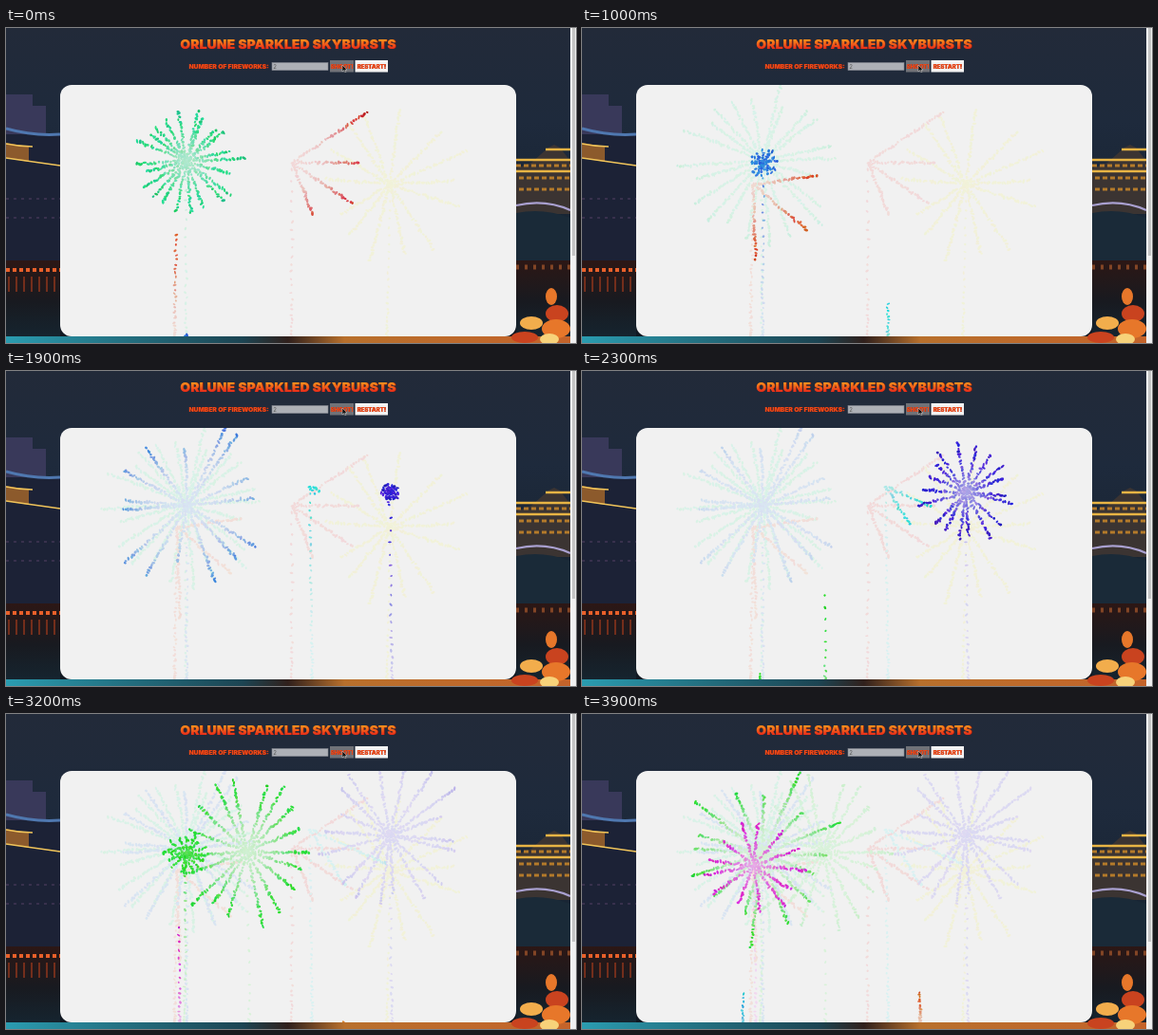
Animation, 600 px wide and 332 px high, one loop 4 s. Source, as an HTML page with a canvas:

```html
<!DOCTYPE html>
<html lang="en">
<head>
<meta charset="utf-8">
<title>Fireworks</title>
<style>
html, body { margin: 0; width: 100%; height: 100%; overflow: hidden; background: #1c2536; }
#stage { position: absolute; left: 0; top: 0; width: 600px; height: 332px; overflow: hidden; }
#stage > svg { position: absolute; left: 0; top: 0; }
canvas { position: absolute; left: 57px; top: 60px; border-radius: 12px; background: #f1f1f1; }
text { font-family: Inter, "DejaVu Sans", sans-serif; font-weight: 900; text-anchor: middle; }
.title { font-size: 13.8px; letter-spacing: .2px; fill: url(#flame); text-shadow: .6px .8px 0 #a81c08; }
.small { font-size: 6.7px; fill: #ec4a18; text-shadow: .4px .4px 0 #a81c08; }
.button { font-size: 6px; }
.value { font-size: 6px; font-weight: 400; fill: #555; }
</style>
</head>
<body>
<div id="stage">
<svg width="600" height="332" viewBox="0 0 600 332">
  <defs>
    <linearGradient id="sky" x2="0" y2="1">
      <stop offset="0" stop-color="#222a39"/>
      <stop offset=".3" stop-color="#1e2a3c"/>
      <stop offset=".7" stop-color="#172331"/>
      <stop offset="1" stop-color="#10161f"/>
    </linearGradient>
    <linearGradient id="water" x2="0" y2="1">
      <stop offset="0" stop-color="#2c1715"/>
      <stop offset=".5" stop-color="#181a20"/>
      <stop offset="1" stop-color="#152632"/>
    </linearGradient>
    <linearGradient id="shore">
      <stop offset="0" stop-color="#2a9cb0"/>
      <stop offset=".42" stop-color="#1c4452"/>
      <stop offset=".5" stop-color="#30201c"/>
      <stop offset=".6" stop-color="#b8702c"/>
      <stop offset="1" stop-color="#c4632a"/>
    </linearGradient>
    <linearGradient id="flame" x2="0" y2="1">
      <stop offset=".25" stop-color="#f8901c"/>
      <stop offset=".8" stop-color="#e8301a"/>
    </linearGradient>
  </defs>
  <rect width="600" height="332" fill="url(#sky)"/>
  <!-- left bank -->
  <path d="M0 70h28v12h14v30H0z" fill="#39395a"/>
  <path d="M0 112h57v133H0z" fill="#1c2236"/>
  <path d="M0 106q28 8 57 6" fill="none" stroke="#4f78b0" stroke-width="3"/>
  <path d="M0 121l24 4v16l-24 -4z" fill="#8c5a2c"/>
  <path d="M0 137q28 4 57 8M0 122q14 3 28 3" fill="none" stroke="#f0c45a" stroke-width="1.6"/>
  <path d="M0 180h57M0 200h57" stroke="#554064" stroke-dasharray="3 5"/>
  <rect y="245" width="57" height="87" fill="url(#water)"/>
  <path d="M0 255h57" stroke="#e8602a" stroke-width="4" stroke-dasharray="4 3"/>
  <path d="M2 270h54" stroke="#b8401c" stroke-width="16" stroke-dasharray="2 6" opacity=".55"/>
  <!-- right bank -->
  <path d="M537 148l16 -6 18 -16 6 -3 6 3 11 14v56h-57z" fill="#3b3432"/>
  <path d="M537 139h57M537 151h57M568 128h26" stroke="#e8b444" stroke-width="2.4"/>
  <path d="M537 145h57M540 158h54M540 170h54" stroke="#b47a2a" stroke-width="3" stroke-dasharray="5 3"/>
  <path d="M537 187q30 -7 57 5" fill="none" stroke="#a9a0d0" stroke-width="2.2"/>
  <path d="M537 195q28 -6 57 5v45h-57z" fill="#1a2a38"/>
  <rect x="537" y="245" width="57" height="87" fill="url(#water)"/>
  <path d="M537 252h57" stroke="#a8582c" stroke-width="5" stroke-dasharray="3 6" opacity=".7"/>
  <!-- foreground -->
  <path d="M0 325h594v7H0z" fill="url(#shore)"/>
  <g fill="#e7772a">
    <ellipse cx="574" cy="283" rx="6" ry="9"/>
    <ellipse cx="580" cy="301" rx="12" ry="9" fill="#c9431f"/>
    <ellipse cx="553" cy="311" rx="12" ry="7" fill="#f2ad4c"/>
    <ellipse cx="579" cy="317" rx="15" ry="10"/>
    <ellipse cx="546" cy="326" rx="14" ry="6" fill="#c9431f"/>
    <ellipse cx="572" cy="328" rx="10" ry="6" fill="#f7d27a"/>
  </g>
  <!-- scrollbar -->
  <path d="M594 0h6v332h-6z" fill="#f0f0f0"/>
  <path d="M596 0h3v240h-3z" fill="#c4c4c4"/>
  <!-- controls -->
  <text class="title" x="297" y="21.5">ORLUNE SPARKLED SKYBURSTS</text>
  <text class="small" x="234.5" y="42.5">NUMBER OF FIREWORKS:</text>
  <rect x="280" y="36.5" width="59" height="8" fill="#adb0b6" stroke="#83868e" stroke-width=".6"/>
  <text class="value" x="283" y="43">2</text>
  <rect x="341" y="34" width="25" height="12.5" fill="#707278"/>
  <text class="small button" x="353.5" y="42.5">SHOOT!</text>
  <rect x="367.5" y="34" width="34.5" height="12.5" fill="#f2f2f2"/>
  <text class="small button" x="384.7" y="42.5">RESTART!</text>
  <path d="M354 39v7l1.7 -1.5 1.2 2.3 1 -.5 -1.1 -2.2h2.2z" fill="#111" stroke="#fff" stroke-width=".4"/>
</svg>
<canvas id="show" width="480" height="265"></canvas>
</div>
<script>
const LOOP = 4000, TICK = 100, STEP = 30, SPEED = 0.11, GROUND = 326;
const FADE = 430, PALE = 90;
const ctx = document.getElementById('show').getContext('2d');
const marks = [];

let seed = 7;
const rand = () => {
  seed = (seed * 16807) % 2147483647;
  return seed / 2147483647;
};
const between = (a, b) => a + (b - a) * rand();
const spread = r => between(-r, r);

function mark(time, x, y, size, hue, light) {
  marks.push({
    time, x: x + spread(1), y: y + spread(1),
    rx: size * between(0.7, 1.3), ry: size * between(0.5, 0.8), turn: rand() * Math.PI,
    hue: hue + spread(9), light: light + spread(5)
  });
}

// A rocket climbs to (x, y), then throws sparks evenly over an arc in degrees.
function firework({ x, y, burst, climb = 800, hue, light = 51, rays = 18, from = 0, to = 360 }) {
  const lean = spread(3), full = to - from === 360;
  for (let t = 0; t < climb; t += STEP) {
    const k = (t / climb) ** 1.7;
    mark(burst - climb + t, x + lean * (1 - k), GROUND + (y - GROUND) * k, 1.6, hue, light);
  }
  const gap = (to - from) / (full ? rays : rays - 1);
  for (let i = 0; i < rays; i++) {
    const angle = (from + gap * i + (full ? spread(gap * 0.35) : 0)) * Math.PI / 180;
    const speed = SPEED * between(0.75, 1.02), life = between(650, 920);
    for (let age = rand() * STEP; age < life; age += STEP) {
      const r = age * speed;
      mark(burst + age, x + Math.cos(angle) * r, y + Math.sin(angle) * r, 1.9, hue, light);
    }
  }
}

[
  { x: 404, y: 165, burst: -2500, hue: 60, rays: 14 },
  { x: 301, y: 142, burst: -950, hue: 2, light: 42, rays: 4, from: -34, to: 68 },
  { x: 190, y: 140, burst: -550, hue: 152, light: 47, rays: 22 },
  { x: 180, y: 165, burst: 250, climb: 1250, hue: 14, rays: 3, from: -8, to: 88 },
  { x: 191, y: 142, burst: 850, climb: 950, hue: 214, rays: 15 },
  { x: 320, y: 122, burst: 1800, climb: 1260, hue: 180, rays: 2, from: 24, to: 58 },
  { x: 404, y: 128, burst: 1800, climb: 720, hue: 248, light: 46 },
  { x: 254, y: 145, burst: 2460, climb: 500, hue: 125 },
  { x: 190, y: 148, burst: 2970, hue: 122, rays: 16 },
  { x: 181, y: 160, burst: 3400, hue: 302, rays: 13 },
  { x: 168, y: 150, burst: 4600, climb: 1100, hue: 190 },
  { x: 354, y: 150, burst: 5200, climb: 2050, hue: 22 }
].forEach(firework);

marks.sort((a, b) => a.time - b.time);

function draw(now) {
  ctx.setTransform(1, 0, 0, 1, 0, 0);
  ctx.clearRect(0, 0, 480, 265);
  ctx.translate(-57, -60);
  for (const m of marks) {
    if (m.time > now) break;
    // Sparks dim fast, then leave a lasting pale stain.
    const glow = Math.exp(-(((now - m.time) / FADE) ** 2));
    ctx.fillStyle = `hsl(${m.hue} ${50 + 24 * glow}% ${PALE + (m.light - PALE) * glow}%)`;
    ctx.beginPath();
    ctx.ellipse(m.x, m.y, m.rx, m.ry, m.turn, 0, Math.PI * 2);
    ctx.fill();
  }
}

const start = performance.now();
let shown = -1;
function frame() {
  const t = Math.floor(((performance.now() - start) % LOOP) / TICK) * TICK;
  if (t !== shown) draw(shown = t);
  requestAnimationFrame(frame);
}
frame();
</script>
</body>
</html>
```
